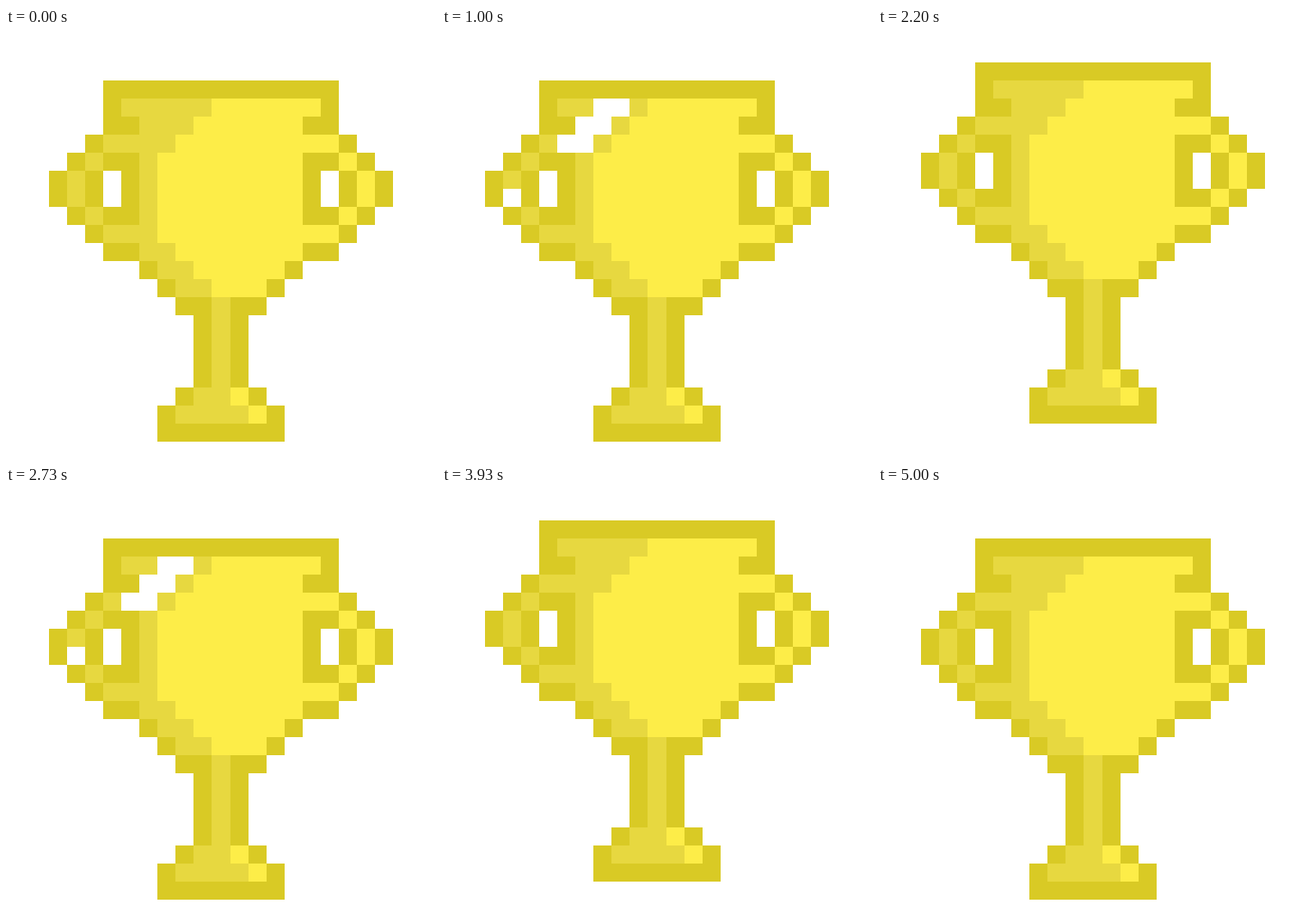
An HTML page with a canvas for the animation above (5.07 s loop, 500x500 px).

```html
<!DOCTYPE html>
<html>
<head>
<meta charset="utf-8">
<style>
html, body { margin: 0; height: 100%; overflow: hidden; background: #fff; }
canvas { display: block; }
</style>
</head>
<body>
<canvas id="stage" width="500" height="500"></canvas>
<script>
const ctx = document.getElementById('stage').getContext('2d');
const LOOP = 5070;
const COLORS = { D: '#d9ca25', S: '#e7d840', L: '#fded48' };

// D outline, S shade, L light
const TROPHY = [
  '...DDDDDDDDDDDDD...',
  '...DSSSSSLLLLLLD...',
  '...DDSSSLLLLLLDD...',
  '..DSSSSLLLLLLLLLD..',
  '.DSDDSLLLLLLLLDDLD.',
  'DSD.DSLLLLLLLLD.DLD',
  'DSD.DSLLLLLLLLD.DLD',
  '.DSDDSLLLLLLLLDDLD.',
  '..DSSSLLLLLLLLLLD..',
  '...DDSSLLLLLLLDD...',
  '.....DSSLLLLLD.....',
  '......DSSLLLD......',
  '.......DDSDD.......',
  ...Array(4).fill('........DSD........'),
  '.......DSSLD.......',
  '......DSSSSLD......',
  '......DDDDDDD......'
];

const CYCLE = 17;
const HOPS = [0, 1, 2, 1, 0, 1, 2, 1];

const left = col => Math.round(50 + col * 400 / 19);

function draw(step) {
  const lift = HOPS[step] || 0;
  // A two-cell diagonal glint crosses the cup after the hops
  const glint = step > 8 && step < 16 ? 7 + 3 * (step - 10) : -9;
  const shines = (col, row) =>
    col < 16 && row < 12 && (col + row === glint || col + row === glint + 1);

  ctx.fillStyle = '#fff';
  ctx.fillRect(0, 0, 500, 500);
  TROPHY.forEach((line, row) => [...line].forEach((cell, col) => {
    if (cell === '.' || cell !== 'D' && shines(col, row)) return;
    ctx.fillStyle = COLORS[cell];
    ctx.fillRect(left(col), 61 + 21 * (row - lift), left(col + 1) - left(col), 21);
  }));
}

function tick() {
  const t = performance.now() % LOOP;
  // Steps last 130 ms and 70 ms in turn
  const step = 2 * Math.floor(t / 200) + (t % 200 >= 130 ? 1 : 0);
  draw(step % CYCLE);
  requestAnimationFrame(tick);
}
tick();
</script>
</body>
</html>
```
